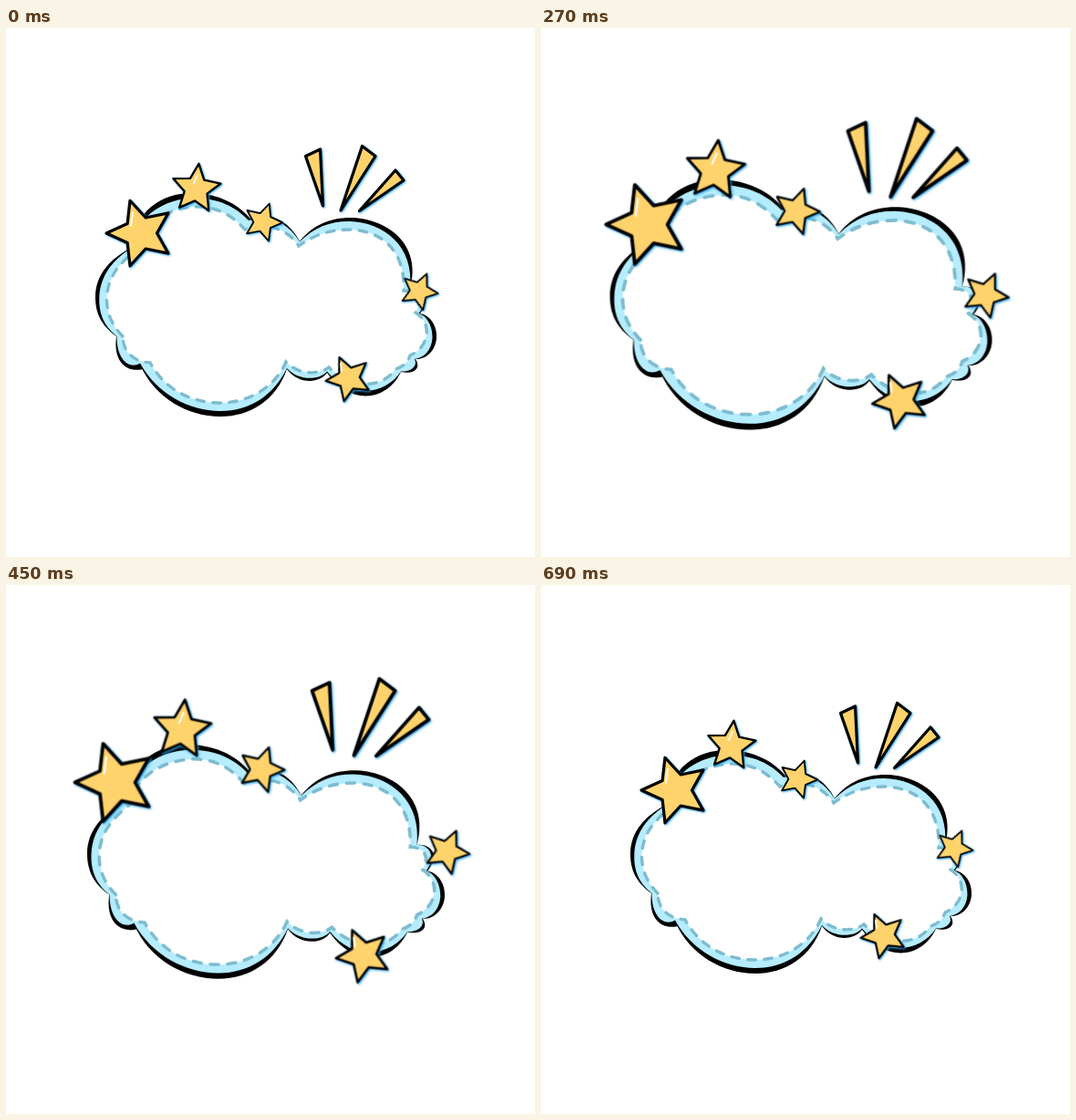
Recreate the animation shown at these times as an HTML page without scripts. Size 580x580 px, loop 960 ms.

```html
<!DOCTYPE html>
<html lang="en">
<head>
<meta charset="utf-8">
<title>Cloud and stars</title>
<style>
  html, body { margin: 0; width: 100%; height: 100%; overflow: hidden; background: #fff; }
  svg { display: block; width: 100vw; height: 100vh; }

  /* 960 ms loop on a 30 ms grid: one tick is 3.125% */
  .cloud, .sparks { animation: 960ms -1ms infinite; }
  .cloud { transform-origin: 285px 304.5px; animation-name: swell; }
  .sparks { transform-origin: 291.5px 270px; animation-name: burst; }

  @keyframes swell {
    0% { transform: scale(1); animation-timing-function: steps(7); }
    21.875% { transform: scale(1.138); animation-timing-function: steps(1); }
    25% { transform: scale(1.132); animation-timing-function: steps(11); }
    59.375%, 100% { transform: scale(1); }
  }
  @keyframes burst {
    0%, 9.375% { transform: scale(1); animation-timing-function: steps(8); }
    34.375% { transform: scale(1.285); animation-timing-function: steps(12); }
    71.875%, 100% { transform: scale(1); }
  }

  .band { fill: #b5ecff; }
  .stitch { fill: #fff; stroke: #7dbccf; stroke-width: 3.4; stroke-linecap: round; stroke-dasharray: 8.5 9.5; }
  .glow { filter: drop-shadow(1px 1.5px 1px #2aa6f2); }
  .gold { fill: #ffd36c; stroke: #000; stroke-width: 3.4; stroke-linejoin: round; }
  .rays { stroke-width: 3.2; }
  .shine { fill: none; stroke: #fff; stroke-width: 2; stroke-linecap: round; opacity: .85; }
</style>
</head>
<body>
<svg viewBox="0 0 580 580">
  <defs>
    <path id="star" class="gold" d="M0-40 11.2-15.4 38-12.4 18.1 5.9 23.5 32.4 0 19-23.5 32.4-18.1 5.9-38-12.4-11.2-15.4Z"/>
  </defs>

  <g class="cloud">
    <path d="M121 338C104 326 98 312 98 295C98 270 115 252 139 240
      C140 200 172 180 206 181C234 182 254 193 268 209C286 200 310 210 322 234
      C336 216 356 208 377 208C416 208 457 236 443 286C456 284 469 296 454 313
      C466 315 473 328 472 340C471 354 460 364 449 363C456 374 446 380 433 377
      C418 409 378 415 352 378C344 390 320 391 308 374
      C296 408 268 426 235 426C200 426 163 406 147 369L150 374C134 378 117 368 121 338Z"/>
    <path class="band" d="M121.500 338C106 326 101.500 311 102.300 295C103.500 271 117 254 139 240
      C143 205 175 187 206 186.500C233 186.500 252 196 266 211C286 204 309 212 322 234.500
      C338 218 357 211.500 377 212C413 213 448 238 443 286C454 284.500 465 297 452.500 313
      C462 315.500 468 328 467.500 340C466.500 353 459 361.500 448 363C452 371 443 377.500 433 376.500
      C417 401 378 409 352 376.500C344 386.500 320 387 308 373
      C294 402 268 420 235 420C201 420 165 401 147 367.500C135 375 121 363 121.500 338Z"/>
    <path class="stitch" d="M128 338C116 326 110 312 110.500 295C112 274 122 260 142 244
      C148 214 178 196 212 196C236 197 250 208 262 221C284 213 308 219 321 239
      C338 226 357 221 377 221C412 222 438 244 436 288C448 288 458 296 449 312
      C468 324 464 350 443 359C440 368 434 372 427 374C412 396 378 396 354 372
      C342 381 320 380 307 366C296 392 268 411 235 411
      C202 411 174 396 158 367C140 366 128 355 128 338Z"/>
  </g>

  <g class="sparks">
    <g class="glow">
      <path class="gold rays" d="M328.500 140.500 344.500 133 347.500 195Z
        M390.500 129.500 405 140.500 367 200Z M427 156 436 167 387.500 200.500Z"/>
      <use href="#star" transform="translate(147.600 225) rotate(-18) scale(.94)"/>
      <use href="#star" transform="translate(208.500 176.300) rotate(6) scale(.69)"/>
      <use href="#star" transform="translate(281.700 213) rotate(19) scale(.54)"/>
      <use href="#star" transform="translate(452.800 288.700) rotate(24) scale(.525)"/>
      <use href="#star" transform="translate(375.800 384.300) rotate(-24) scale(.635)"/>
    </g>
    <path class="shine" d="M139 202 137 217M210 161 206 170M367 368 368 376"/>
  </g>
</svg>
</body>
</html>
```
